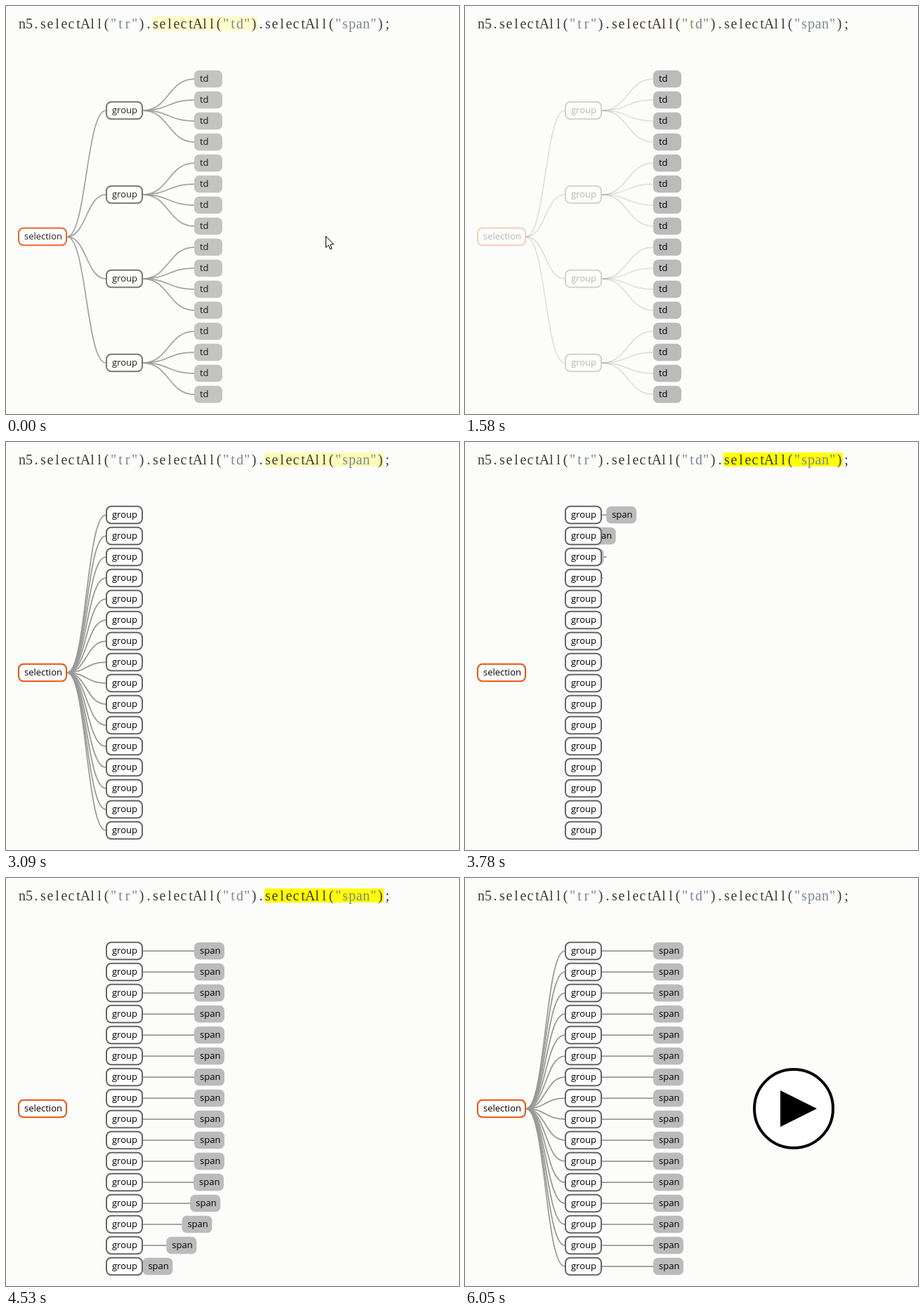
An HTML page with a canvas for the animation above (6310 ms loop, 645 by 582 pixels).

```html
<!DOCTYPE html>
<html lang="en">
<head>
<meta charset="utf-8">
<title>Nested selections</title>
<style>
  html, body { margin: 0; width: 100%; height: 100%; overflow: hidden; background: #fcfcfa; }
  canvas { display: block; width: 645px; height: 582px; }
</style>
</head>
<body>
<canvas id="stage"></canvas>
<script>
const W = 645, H = 582, LOOP = 6310, TICK = 68.65;
const LEAVES = 16, ROW = 30, TOP = 104, MID = 329;
const ROOT_X = 18, GROUP_X = 143, LEAF_X = 268;
const ROOT_W = 68, GROUP_W = 51, TD_W = 40, SPAN_W = 43;
const GRAY = '#bbb', DARK = '#666', ORANGE = '#e6550d';

const canvas = document.getElementById('stage');
const ctx = canvas.getContext('2d');
const dpr = window.devicePixelRatio || 1;
canvas.width = W * dpr;
canvas.height = H * dpr;

const lerp = (a, b, p) => a + (b - a) * p;
const rowY = i => TOP + ROW * i;
const groupY = k => rowY(4 * k + 1.5);

// cubic in-out progress of a transition
function ease(t, start, dur = 500) {
  const u = Math.min(1, Math.max(0, (t - start) / dur));
  return u < 0.5 ? 4 * u ** 3 : 1 - 4 * (1 - u) ** 3;
}

function faded(alpha, draw) {
  if (alpha <= 0) return;
  ctx.save();
  ctx.globalAlpha *= alpha;
  draw();
  ctx.restore();
}

function link(x0, y0, x1, y1) {
  const mx = (x0 + x1) / 2;
  ctx.beginPath();
  ctx.moveTo(x0, y0);
  ctx.bezierCurveTo(mx, y0, mx, y1, x1, y1);
  ctx.strokeStyle = '#999';
  ctx.lineWidth = 1.75;
  ctx.stroke();
}

function label(text, x, cy) {
  ctx.font = '13px "Open Sans", sans-serif';
  ctx.textAlign = 'left';
  ctx.fillStyle = '#000';
  ctx.fillText(text, x + 8, cy + 4);
}

function box(x, cy, w, fill, stroke) {
  ctx.beginPath();
  ctx.roundRect(x, cy - 12.25, w, 24.5, 7);
  ctx.fillStyle = fill;
  ctx.fill();
  if (!stroke) return;
  ctx.strokeStyle = stroke;
  ctx.lineWidth = 2;
  ctx.stroke();
}

function node(text, x, cy, w, fill, stroke) {
  box(x, cy, w, fill, stroke);
  label(text, x, cy);
}

const rootNode = () => node('selection', ROOT_X, MID, ROOT_W, '#fff', ORANGE);
const groupNode = cy => node('group', GROUP_X, cy, GROUP_W, '#fff', DARK);
const rootLink = cy => link(87, MID, 142, cy);

function eachRow(draw) {
  for (let i = 0; i < LEAVES; i++) draw(i, rowY(i));
}

function title(t) {
  const marks = [
    [19, 15, ease(t, -184) - ease(t, 1180)],
    [35, 17, ease(t, 2885) - ease(t, 5550)]
  ];
  for (const [col, len, alpha] of marks) {
    faded(alpha, () => {
      ctx.fillStyle = '#ff0';
      ctx.fillRect(18 + col * 10, 15, len * 10, 20);
    });
  }
  ctx.font = '20px "Liberation Serif", serif';
  ctx.textAlign = 'center';
  let quoted = false;
  [...'n5.selectAll("tr").selectAll("td").selectAll("span");'].forEach((c, i) => {
    const quote = c === '"';
    ctx.fillStyle = quoted || quote ? '#7b8794' : '#3a3a3a';
    ctx.fillText(c, 23 + i * 10, 32);
    if (quote) quoted = !quoted;
  });
}

// selection > 4 groups > 16 cells; the cells outlive their parents
function cellTree(t) {
  const alpha = 1 - ease(t, 1285);
  faded(alpha, () => {
    for (let k = 0; k < 4; k++) rootLink(groupY(k));
    eachRow((i, y) => link(195, groupY(i >> 2), LEAF_X, y));
    rootNode();
    for (let k = 0; k < 4; k++) groupNode(groupY(k));
  });
}

// cells slide left one after another and become groups
function slidingCells(t) {
  const swap = ease(t, 2570);
  eachRow((i, y) => {
    const start = 1747 + 50 * i, p = ease(t, start);
    const x = lerp(LEAF_X, GROUP_X, p), moved = t > start;
    box(x, y, lerp(TD_W, GROUP_W, p), moved ? '#fff' : GRAY, moved && DARK);
    faded(1 - swap, () => label('td', x, y));
    faded(swap, () => label('group', x, y));
  });
}

function spanTree(t) {
  const linkAlpha = ease(t, 2570) - ease(t, 3300, 260) + ease(t, 5550);
  faded(linkAlpha, () => eachRow((i, y) => rootLink(y)));
  faded(ease(t, 2570), rootNode);
  eachRow((i, y) => {
    const start = 3531 + 51 * i;
    if (t < start) return;
    const p = ease(t, start);
    link(195, y, lerp(195, LEAF_X, p), y);
    node('span', lerp(GROUP_X, LEAF_X, p), y, SPAN_W, GRAY);
  });
}

function playButton() {
  ctx.beginPath();
  ctx.arc(468, MID, 56, 0, 2 * Math.PI);
  ctx.fillStyle = '#fff';
  ctx.fill();
  ctx.lineWidth = 4;
  ctx.strokeStyle = '#000';
  ctx.stroke();
  ctx.beginPath();
  ctx.moveTo(449, 303);
  ctx.lineTo(501, MID);
  ctx.lineTo(449, 355);
  ctx.fillStyle = '#000';
  ctx.fill();
}

// the pointer speeds off to the right
function pointer(t) {
  if (t > 560) return;
  const x = 455.5 + 180 * (Math.max(0, t) / 560) ** 2;
  const shape = [[0, 0], [0, 16], [3.7, 12.6], [6.2, 18.5], [8.6, 17.5], [6.1, 11.6], [11, 11.4]];
  ctx.beginPath();
  for (const [dx, dy] of shape) ctx.lineTo(x + dx, 328.5 + dy);
  ctx.closePath();
  ctx.fillStyle = '#fff';
  ctx.fill();
  ctx.lineWidth = 1;
  ctx.strokeStyle = '#000';
  ctx.stroke();
}

function draw(t) {
  ctx.setTransform(dpr, 0, 0, dpr, 0, 0);
  ctx.fillStyle = '#fcfcfa';
  ctx.fillRect(0, 0, W, H);
  title(t);
  faded(lerp(0.88, 1, ease(t, 0)), () => {
    cellTree(t);
    spanTree(t);
    slidingCells(t);
  });
  faded(ease(t, 5550), playButton);
  pointer(t);
}

// motion advances in steps of one tick
function stepped(t) {
  return 1235 + Math.floor((t - 1230) / TICK) * TICK;
}

const begin = performance.now();
function tick() {
  draw(stepped((performance.now() - begin) % LOOP));
  requestAnimationFrame(tick);
}
tick();
</script>
</body>
</html>
```
